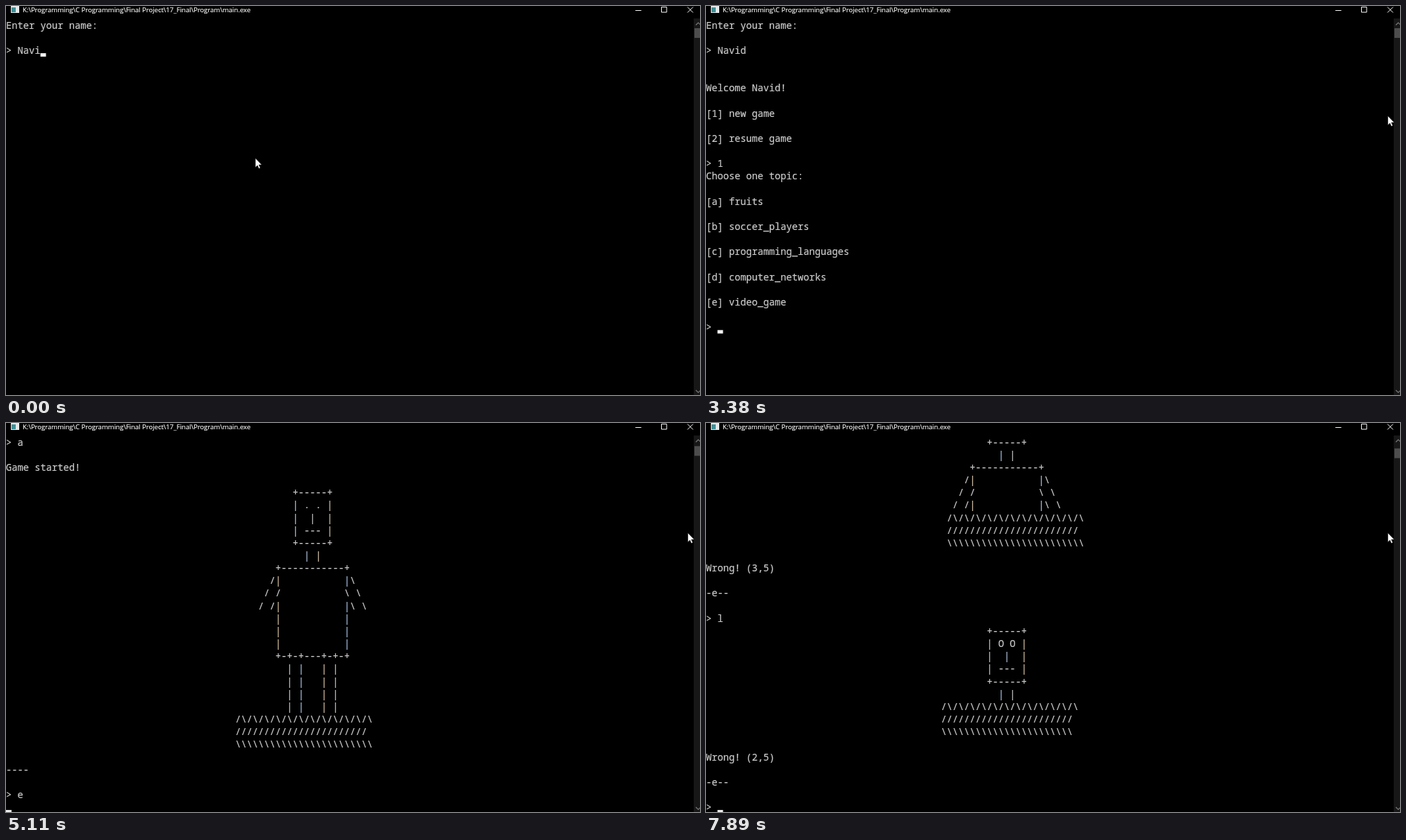
Recreate the animation shown at these times as an HTML page. Size 999 by 561 pixels, loop 8000 ms.

```html
<!DOCTYPE html>
<html lang="en">
<head>
<meta charset="utf-8">
<title>Console game</title>
<style>
  html, body {
    margin: 0;
    width: 100%;
    height: 100%;
    overflow: hidden;
    background: #000;
  }
  #title, #screen, #caret, #thumb, svg { position: absolute; }
  #title {
    left: 24px;
    top: -1px;
    font: 9.54px/14px "Open Sans", "Noto Sans", sans-serif;
    color: #fff;
    white-space: pre;
    -webkit-text-stroke: .15px;
  }
  #screen {
    left: 0;
    top: 18.6px;
    margin: 0;
    font: 13.767px/18.15px "Noto Sans Mono", "DejaVu Sans Mono", monospace;
    font-variant-ligatures: none;
    color: #ccc;
    -webkit-text-stroke: .2px;
  }
  #caret {
    left: 0;
    top: 0;
    width: 8.4px;
    height: 5px;
    background: #f2f2f2;
  }
  #thumb {
    left: 991px;
    top: 32px;
    width: 8px;
    height: 14px;
    background: #4d4d4d;
  }
  svg { left: 0; top: 0; }
</style>
</head>
<body>
<svg width="999" height="561" fill="none">
  <rect x="7" y="0" width="12" height="10" fill="#e4e8ea"/>
  <rect x="8" y="2" width="6" height="7" fill="#3f8f95"/>
  <path d="M906 6.5h8.5M943.5 1.5h7.5v7.5h-7.5zM981 1.5l8 8M989 1.5l-8 8" stroke="#fff"/>
  <rect x="990" y="18" width="9" height="543" fill="#171717"/>
  <path d="M993 27.5l3.5-3.5 3.5 3.5M993 554l3.5 3.5 3.5-3.5" stroke="#777" stroke-width="1.2"/>
</svg>
<div id="title">K:\Programming\C Programming\Final Project\17_Final\Program\main.exe</div>
<div id="thumb"></div>
<pre id="screen"></pre>
<div id="caret"></div>
<svg width="999" height="561">
  <path id="mouse" d="M0 0V13.2L3 10.4 5 15 7.1 14.1 5.1 9.6H9.2Z" fill="#fff" stroke="#000" stroke-width=".5"/>
</svg>
<script>
const LOOP = 8000, ROWS = 30, CELL_W = 8.26, CELL_H = 18.15, TOP = 18.6;
const $ = id => document.getElementById(id);
const at = (col, text) => ' '.repeat(col) + text;

// A man of which only the first `rows` lines stick out of the ground
function figure(col, eye, rows, ground, soil) {
  const gap = ' '.repeat(11), side = at(col, `|${gap}|`);
  const legs = at(col + 2, '| |   | |');
  const head = ['+-----+', `| ${eye} ${eye} |`, '|  |  |', '| --- |', '+-----+', '  | |'];
  const man = [
    ...head.map(s => at(col + 3, s)),
    at(col, '+-----------+'),
    at(col - 1, `/|${gap}|\\`),
    at(col - 2, `/ /${gap}\\ \\`),
    at(col - 3, `/ /|${gap}|\\ \\`),
    side, side, side,
    at(col, '+-+-+---+-+-+'),
    legs, legs, legs, legs
  ].slice(0, rows);
  man.push(at(ground, '/\\'.repeat(12)), at(ground, '/'.repeat(23)));
  if (soil) man.push(at(ground, '\\'.repeat(soil)));
  return man.join('\n');
}

// Everything typed or printed, in order; the caret stands behind the last character
const log = [];
const print = (time, text) => log.push({ time, text });
const ask = (...items) => [...items, '> '].join('\n\n');
const wrong = (man, left) => man + '\n\n' + ask(`Wrong! (${left},5)`, '-e--');

const whole = figure(47, '.', 18, 40, 24), cut = 951;
print(0, ask('Enter your name:') + 'Navi');
print(60, 'd');
print(270, '\n');
print(390, '\n\n' + ask('Welcome Navid!', '[1] new game', '[2] resume game'));
print(1810, '1');
print(2370, '\n' + ask('Choose one topic:', '[a] fruits', '[b] soccer_players',
  '[c] programming_languages', '[d] computer_networks', '[e] video_game'));
print(3940, 'a');
print(4180, '\n\nGame started!\n\n' + whole.slice(0, cut));
print(4240, whole.slice(cut) + '\n\n' + ask('----'));
print(4980, 'e');
print(5110, '\n');
print(5170, '\n' + ask('Correct! (5,5)', '-e--'));
print(5850, 'i');
print(6030, '\n' + wrong(figure(46, 'o', 14, 40, 0), 4));
print(6970, 'o');
print(7040, '\n');
print(7110, wrong(figure(46, 'o', 10, 42, 24), 3));
print(7740, 'l');
print(7890, '\n' + wrong(figure(46, 'O', 6, 41, 23), 2));

// Spans in which the blinking caret is dark
const dark = [[1020, 1810], [1870, 2370], [2930, 3380], [5050, 5110]];

// Subpixel rendering turns upright strokes warm or cold by column
function paint(line) {
  return line.replace(/\|/g, (bar, col) => {
    const warm = Math.cos((col - 47) * Math.PI / 4);
    const rgb = [195 + 25 * warm, 195, 195 - 35 * warm].map(Math.round);
    return `<span style="color:rgb(${rgb})">${bar}</span>`;
  });
}

let shown = '';
function showText(t) {
  const text = log.filter(e => e.time <= t).map(e => e.text).join('');
  if (text === shown) return;
  shown = text;
  const lines = text.split('\n'), scroll = Math.max(0, lines.length - ROWS);
  $('screen').innerHTML = lines.slice(scroll).map(paint).join('\n');
  const x = lines.at(-1).length * CELL_W;
  const y = TOP + (lines.length - scroll) * CELL_H - 5;
  $('caret').style.transform = `translate(${x}px, ${y}px)`;
  $('thumb').style.transform = `translateY(${scroll * 0.055}px)`;
}

function blink(t) {
  const off = dark.some(([from, to]) => t >= from && t < to);
  $('caret').style.visibility = off ? 'hidden' : 'visible';
}

// Eased progress in n equal jumps, the first one at `start`
function jumps(t, start, gap, n) {
  const k = Math.floor((t - start) / gap) + 1;
  const p = Math.min(n, Math.max(0, k)) / n;
  return p * p * (3 - 2 * p);
}
const curve = (a, b, c, p) => a * (1 - p) ** 2 + 2 * b * p * (1 - p) + c * p * p;

function moveMouse(t) {
  const p = jumps(t, 1020, 60, 7), q = jumps(t, 2800, 66.6, 4);
  const x = curve(359, 590, 834, p) + 147.5 * q;
  const y = curve(219.5, -62, 178.5, p) - 20 * q;
  $('mouse').setAttribute('transform', `translate(${x} ${y})`);
}

const begin = performance.now();
function frame() {
  const t = (performance.now() - begin) % LOOP;
  showText(t);
  blink(t);
  moveMouse(t);
  requestAnimationFrame(frame);
}
frame();
</script>
</body>
</html>
```
